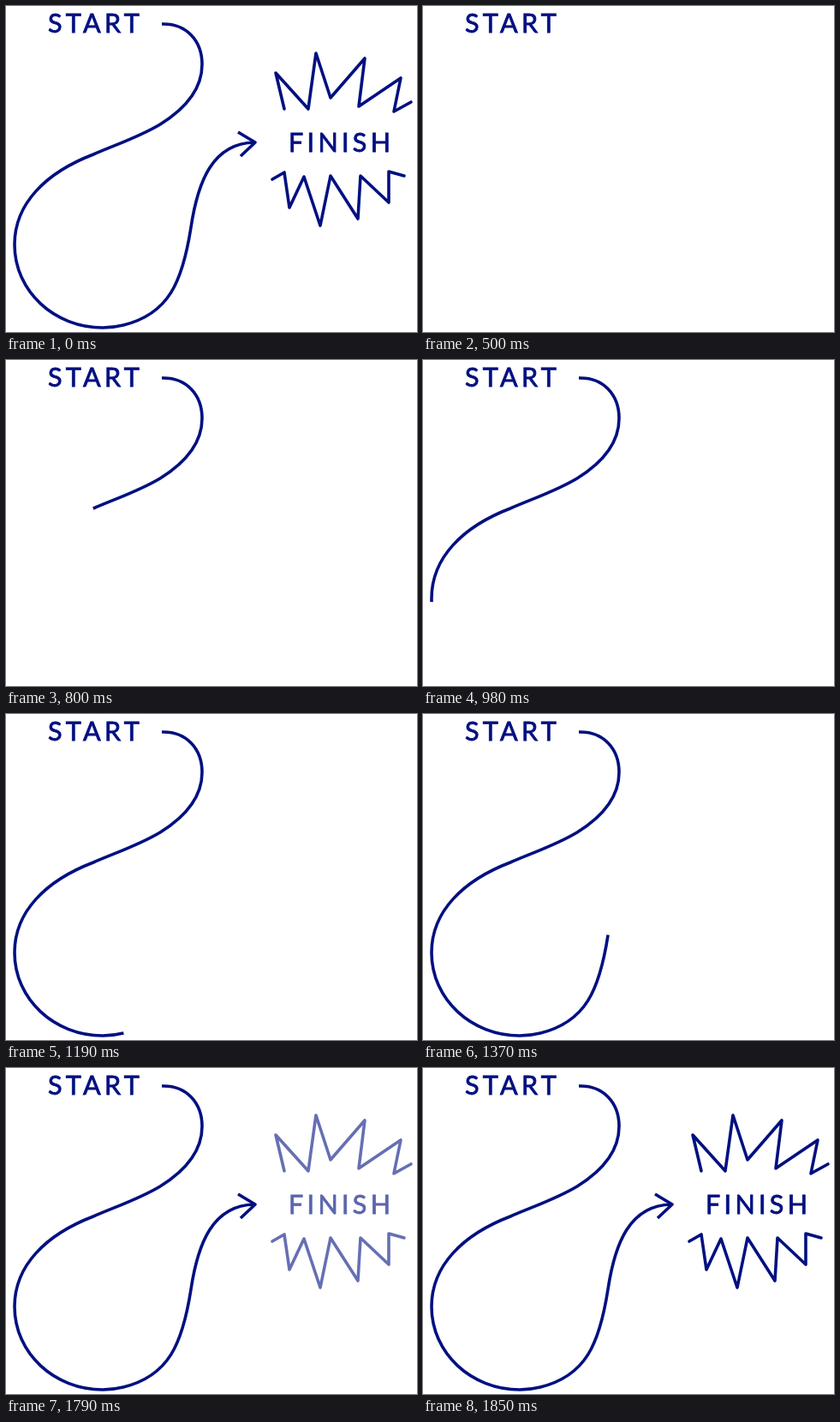
Recreate the animation shown at these times as an HTML page. Size 480x380 px, loop 7660 ms.

```html
<!DOCTYPE html>
<html lang="en">
<head>
<meta charset="utf-8">
<title>Start to finish</title>
<style>
  html, body { margin: 0; width: 100%; height: 100%; overflow: hidden; background: #fff; }
  svg { display: block; width: 100%; height: 100%; }
  path { fill: none; stroke: #001080; stroke-width: 3.6; stroke-linejoin: round; }
  #burst { stroke-linecap: round; }
  text {
    font: 400 30.5px Lato, sans-serif;
    letter-spacing: 4.3px;
    fill: #001080;
    stroke: #001080;
    stroke-width: .8;
  }
</style>
</head>
<body>
<svg viewBox="0 0 480 380">
  <text x="49" y="31">START</text>
  <path id="route"/>
  <path id="arrow" d="M271 147 291 159 274 175"/>
  <text id="finish" x="330" y="170">FINISH</text>
  <path id="burst" d="M325 120 315 78 353 120 362 55 379 107 419 61 412 117 461 84 453 123 473 112
    M311 202 325 194 331 235 348 199 367 256 379 198 411 248 414 198 447 229 447 193 465 198"/>
</svg>
<script>
const LOOP = 7660, STEP = 30, DRAW = 500, ARROW = 1550, FADE = 1700, FADE_TIME = 150;
const [route, arrow, finish, burst] =
  ['route', 'arrow', 'finish', 'burst'].map(id => document.getElementById(id));

// Each leg of the route with the time at which the pen completes it
const legs = [
  [800, 'M182 21C211 20 229 41 229 68C229 98 209 120 180 138C155 153 127 162 102 173'],
  [1190, 'C47 194 10 230 10 278C10 333 57 375 113 375C121 375 129 374 137 372'],
  [1370, 'C190 359 206 322 216 258'],
  [1550, 'C224 205 241 160 290 159']
];

let d = '';
const keys = [[DRAW, 0]];
for (const [time, leg] of legs) {
  route.setAttribute('d', d += leg);
  keys.push([time, route.getTotalLength()]);
}
const total = keys[keys.length - 1][1];

const clamp = v => Math.min(1, Math.max(0, v));

function drawnLength(t) {
  let length = 0;
  for (let i = 1; i < keys.length; i++) {
    const [t0, l0] = keys[i - 1], [t1, l1] = keys[i];
    length += (l1 - l0) * clamp((t - t0) / (t1 - t0));
  }
  return length;
}

function draw(now) {
  const raw = now % LOOP;
  const t = raw < DRAW ? LOOP : DRAW + Math.floor((raw - DRAW) / STEP) * STEP;
  const fade = clamp((t - FADE) / FADE_TIME);
  route.style.visibility = t > DRAW ? 'visible' : 'hidden';
  route.style.strokeDasharray = `${drawnLength(t)} ${total + 10}`;
  arrow.style.visibility = t >= ARROW ? 'visible' : 'hidden';
  finish.style.opacity = t < FADE ? 0 : .1 + .9 * fade;
  burst.style.opacity = fade;
}

const start = performance.now();
function tick() {
  draw(performance.now() - start);
  requestAnimationFrame(tick);
}
tick();
</script>
</body>
</html>
```
